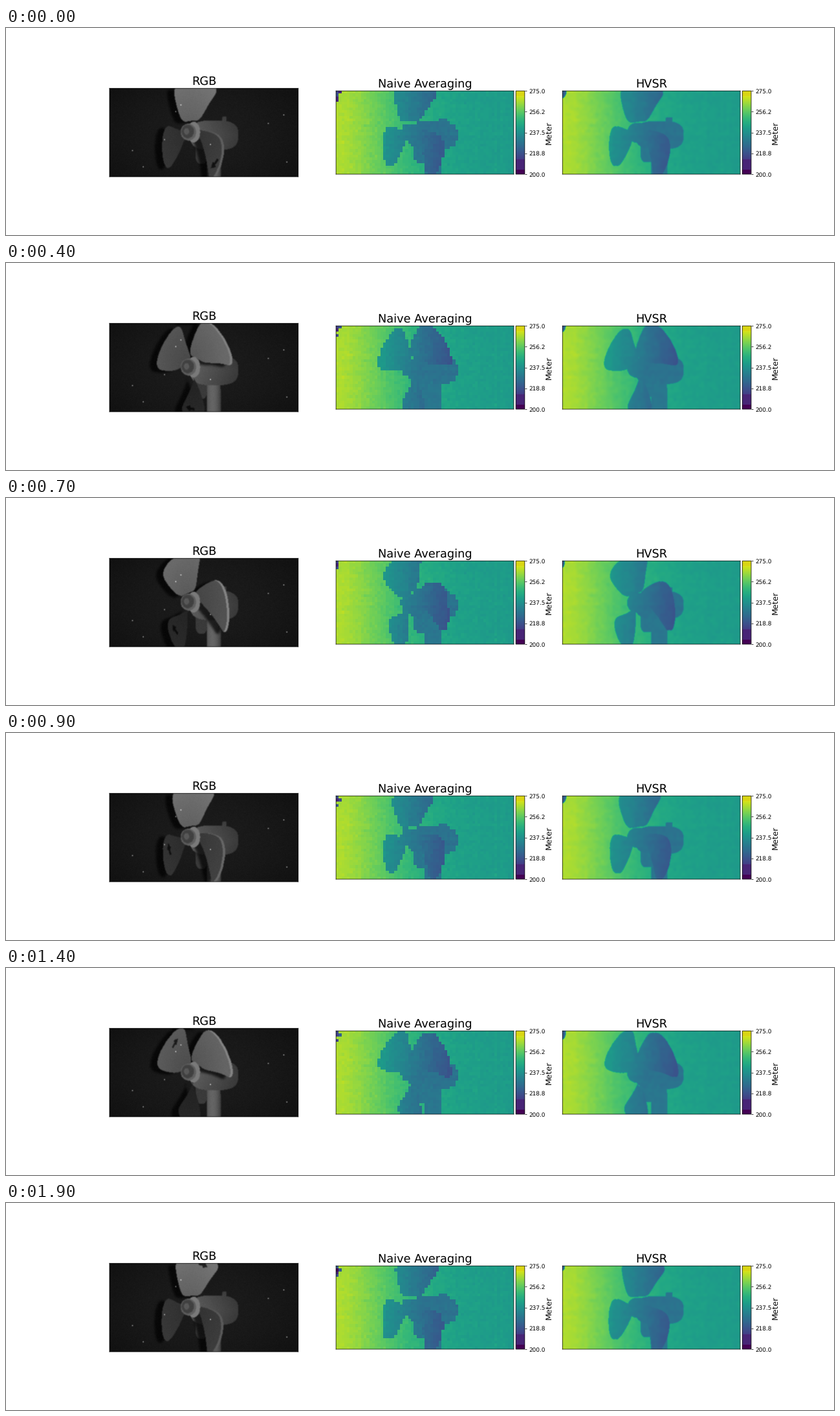
A matplotlib script that plays this animation: 1280 px wide and 320 px high, repeating every 2000 ms.

```python
import numpy as np
import matplotlib.pyplot as plt
from matplotlib.animation import FuncAnimation
from matplotlib.colors import ListedColormap
from matplotlib.path import Path
from mpl_toolkits.axes_grid1 import make_axes_locatable

plt.rcParams["font.family"] = "DejaVu Sans"
plt.rcParams["text.hinting"] = "none"

FRAMES, STEP = 20, 12.8          # degrees turned per frame
W, H, CELL = 320, 150, 5         # fine grid and coarse cell size
NEAR, FAR = 200, 275
HUB_X, HUB_Y, SLANT = 283, 160, 0.66

# Pixel positions of the grid on the stage, used by all shapes
PX = 291.76 / W
X, Y = np.meshgrid(160 + (np.arange(W) + 0.5) * PX,
                   93.2 + (np.arange(H) + 0.5) * PX)
GRID = np.column_stack([X.ravel(), Y.ravel()])
U = (X - 160) / 291.76


def blade_outline(n=72):
    """Rounded sector, skewed and pitched: radius, degrees, axial offset."""
    t = np.linspace(0, 2 * np.pi, n, endpoint=False)
    across = np.sign(np.cos(t)) * np.abs(np.cos(t)) ** 0.4
    along = np.sign(np.sin(t)) * np.abs(np.sin(t)) ** 0.4
    r = 49 + 32.5 * along
    return r, 32 * across + 0.2 * (r - 40), 4 + 8 * across


def arrow_outline(n=24):
    s = np.linspace(0, 1, n)
    half = np.where(s < 0.5, 2, 11 * (1 - s))
    r = 66 + np.concatenate([half, -half[::-1]])
    return r, 7 + 18 * np.concatenate([s, s[::-1]]), 7


def project(shape, angle):
    """Oblique view of a shape on the turning propeller."""
    r, a, z = shape
    t = np.radians(a + angle)
    r = r * (1 + 0.09 * np.sin(t))
    return np.column_stack([HUB_X + z + SLANT * r * np.sin(t),
                            HUB_Y - r * np.cos(t)])


def mask(points):
    return Path(points).contains_points(GRID).reshape(H, W).astype(float)


def block(cx, cy, rx, ry, power=2):
    """Ellipse, or a rounded box for higher powers."""
    d = np.abs((X - cx) / rx) ** power + np.abs((Y - cy) / ry) ** power
    return (d < 1).astype(float)


def smooth(a, n=1):
    for _ in range(n):
        p = np.pad(a, 1, mode="edge")
        p = (p[:-2] + 2 * p[1:-1] + p[2:]) / 4
        a = (p[:, :-2] + 2 * p[:, 1:-1] + p[:, 2:]) / 4
    return a


def paint(img, value, m):
    return img * (1 - m) + value * m


def shift_left(m, n):
    return np.roll(m, -n, axis=1)


def spread(m):
    """Widen a mask to the left, as the depth sensor does."""
    return np.maximum(m, shift_left(m, 5))


BLADE, ARROW = blade_outline(), arrow_outline()
HUB = block(286, 162, 15, 16)
NECK = block(302, 193, 9, 17, 3)
POST = block(321, 225, 11, 40, 8)
MOTOR = np.maximum(block(322, 166, 37, 23, 3), block(337.5, 142, 3, 5, 8))

rng = np.random.default_rng(4)
GRAIN = rng.normal(0, 1.5, (H, W))
CELL_NOISE = (rng.normal(0, 0.55, (H // CELL, W // CELL))
              + rng.normal(0, 0.25, (H // CELL, 1))
              + rng.normal(0, 0.25, (1, W // CELL)))
SPECKS = sum(np.exp(-((X - x) ** 2 + (Y - y) ** 2) / 0.9)
             for x, y in rng.uniform((170, 110), (445, 220), (9, 2)))

WALL = 27 - 26 * (U - 0.5) ** 2 - 4 * ((Y - 162) / 68) ** 2
WALL_DEPTH = 241 + 25 * np.exp(-(U / 0.4) ** 1.7)
BLADE_DEPTH = 237.5 - 54 * (U - 0.30) - 0.02 * (Y - 162)
RADIUS = np.hypot((X - HUB_X) / SLANT, Y - HUB_Y)


def photo(angles, blades):
    img = paint(WALL, 58, smooth(NECK))
    img = paint(img, 100 - 0.25 * (X - 319) ** 2, smooth(POST))
    img = paint(img, 88 - 0.5 * (X - 300) - 0.25 * np.abs(Y - 166),
                smooth(MOTOR))
    shade = np.roll(np.maximum.reduce(blades), (3, -12), axis=(0, 1))
    img = img * (1 - 0.7 * smooth(shade, 8))
    for i, (angle, blade) in enumerate(zip(angles, blades)):
        t = np.radians(angle)
        tone = 74 + 36 * np.cos(t - 0.09)
        tone = tone * np.clip(0.84 + 0.0025 * RADIUS, 0.8, 1.05)
        img = paint(img, tone, smooth(blade))
        rim = blade * (1 - shift_left(blade, 4))
        img = img + 52 * max(0, np.sin(t)) ** 3 * smooth(rim)
        if i == 1:
            img = paint(img, tone * 0.3, smooth(mask(project(ARROW, angle))))
    img = paint(img, 122, smooth(block(290, 161, 10, 16)))
    img = paint(img, 95, smooth(block(282, 161, 12, 13)))
    img = paint(img, 65, smooth(block(281, 160, 9.5, 10.5)))
    img = paint(img, 88, smooth(block(279, 160, 4, 5)))
    return img + GRAIN + 130 * SPECKS


def depth_layers(blades):
    yield 229.5, spread(np.maximum(NECK, POST))
    yield 228.5, spread(MOTOR)
    yield BLADE_DEPTH, spread(np.maximum.reduce(blades + [HUB]))


def depth_maps(blades, k):
    frame_rng = np.random.default_rng(100 + k)
    noise = CELL_NOISE + frame_rng.normal(0, 0.25, CELL_NOISE.shape)
    coarse, fine = WALL_DEPTH, WALL_DEPTH
    for value, m in depth_layers(blades):
        coarse = paint(coarse, value, m)
        fine = paint(fine, value, smooth(m))
    mid = CELL // 2
    coarse = coarse[mid::CELL, mid::CELL] + noise
    fine = fine + smooth(np.kron(noise, np.ones((CELL, CELL))), 6)

    # Unreliable readings in the upper left corner
    for row in range(4):
        n = frame_rng.integers(row < 2, 3 - row // 2)
        coarse[row, :n] = frame_rng.uniform(200, 224, n)
    w, h = frame_rng.uniform(4, 9), frame_rng.uniform(8, 14)
    fine = paint(fine, 222, smooth(block(160, 93, w, h)))
    return coarse, fine


def scene(k):
    angles = [STEP * k + 120 * i for i in range(3)]
    blades = [mask(project(BLADE, a)) for a in angles]
    return (photo(angles, blades), *depth_maps(blades, k))


# Viridis with flat bands at both ends
colors = plt.get_cmap("viridis")(np.linspace(0, 1, 256))
colors[:13] = colors[0]
colors[13:46] = colors[26]
colors[241:] = (0.85, 0.835, 0.08, 1)
DEPTH_CMAP = ListedColormap(colors)

fig, axes = plt.subplots(1, 3, figsize=(20, 5), dpi=64)
fig.patch.set_facecolor("white")
images = []
for ax, title, data in zip(axes, ("RGB", "Naive Averaging", "HVSR"), scene(0)):
    ax.set_title(title, fontsize=20)
    ax.set_xticks([])
    ax.set_yticks([])
    for spine in ax.spines.values():
        spine.set_snap(False)
    if title == "RGB":
        im = ax.imshow(data, cmap="gray", vmin=0, vmax=255)
    else:
        im = ax.imshow(data, cmap=DEPTH_CMAP, vmin=NEAR, vmax=FAR)
        cax = make_axes_locatable(ax).append_axes("right", size="5%", pad=0.05)
        bar = fig.colorbar(im, cax=cax, ticks=np.linspace(NEAR, FAR, 5),
                           format="%.1f")
        bar.set_label("Meter", fontsize=14, labelpad=0)
        bar.outline.set_snap(False)
    images.append(im)


def update(k):
    for im, data in zip(images, scene(k)):
        im.set_data(data)
    return images


anim = FuncAnimation(fig, update, frames=FRAMES, interval=100,
                     repeat=True, repeat_delay=0, blit=False)
plt.show()
```
